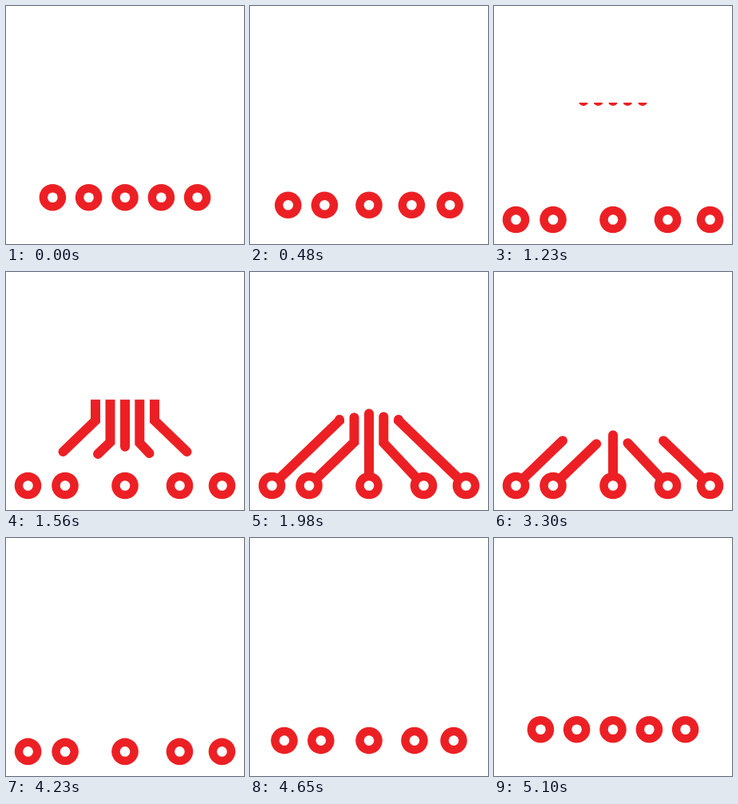
Write an HTML page with a canvas that moves like this. It is 298 by 298 pixels and loops after 5.4 s.

```html
<!DOCTYPE html>
<html lang="en">
<head>
<meta charset="utf-8">
<title>Circuit pulses</title>
<style>
  html, body { margin: 0; width: 100%; height: 100%; overflow: hidden; background: #fff; }
  canvas { display: block; width: 298px; height: 298px; }
</style>
</head>
<body>
<canvas id="stage" width="298" height="298"></canvas>
<script>
const ctx = document.getElementById('stage').getContext('2d');
const RED = '#ec2024', SIZE = 298, LOOP = 5400, STEP = 30;
const NEAR_Y = 239.7, FAR_Y = 267.5;
const RING = 16.8, HOLE = 6.3, STROKE = 12;

// near / far: ring centres; wire: x of the vertical part; bend: y of its corner
const tracks = [
  { near: 58.4, far: 27.5, wire: 112, bend: 186 },
  { near: 103.6, far: 74, wire: 130.5, bend: 213 },
  { near: 149, far: 149, wire: 149, bend: 230 },
  { near: 194.4, far: 217.5, wire: 167.3, bend: 214 },
  { near: 239.6, far: 270.5, wire: 186, bend: 186 }
];

// top: clip edge at the start and end of the pulse's growth
const pulses = [
  { start: 1200, top: [112, 161], ease: u => 1 - (1 - u) ** 4 },
  { start: 2400, top: [147, 160], ease: sine }
];

function sine(u) { return (1 - Math.cos(Math.PI * u)) / 2; }
const lerp = (a, b, p) => a + (b - a) * p;
const span = (t, start, length) => Math.min(1, Math.max(0, (t - start) / length));

function drawPulse(t, { start, top, ease }) {
  if (t < start || t >= start + 1200) return;
  const grow = span(t, start, 600);
  const head = sine(grow), tail = sine(span(t, start + 600, 600));
  const edge = lerp(...top, ease(grow)), origin = edge - 3;

  ctx.save();
  ctx.beginPath();
  ctx.rect(0, edge, SIZE, SIZE);
  ctx.clip();
  for (const { far, wire, bend } of tracks) {
    const length = bend - origin + Math.hypot(far - wire, FAR_Y - bend) - 16;
    ctx.setLineDash([Math.max(0.01, (head - tail) * length), 1000]);
    ctx.lineDashOffset = -tail * length;
    ctx.beginPath();
    ctx.moveTo(wire, origin);
    ctx.lineTo(wire, bend);
    ctx.lineTo(far, FAR_Y);
    ctx.stroke();
  }
  ctx.restore();
}

function disc(x, y, radius, color) {
  ctx.fillStyle = color;
  ctx.beginPath();
  ctx.arc(x, y, radius, 0, 2 * Math.PI);
  ctx.fill();
}

function draw(t) {
  ctx.fillStyle = '#fff';
  ctx.fillRect(0, 0, SIZE, SIZE);
  ctx.strokeStyle = RED;
  ctx.lineWidth = STROKE;
  ctx.lineCap = 'round';
  pulses.forEach(pulse => drawPulse(t, pulse));

  const spread = sine(span(t, 0, 1200)) - sine(span(t, 4200, 900));
  const y = lerp(NEAR_Y, FAR_Y, spread);
  for (const { near, far } of tracks) {
    const x = lerp(near, far, spread);
    disc(x, y, RING, RED);
    disc(x, y, HOLE, '#fff');
  }
}

function tick() {
  const t = performance.now() % LOOP;
  draw(Math.floor(t / STEP) * STEP);
  requestAnimationFrame(tick);
}
tick();
</script>
</body>
</html>
```
